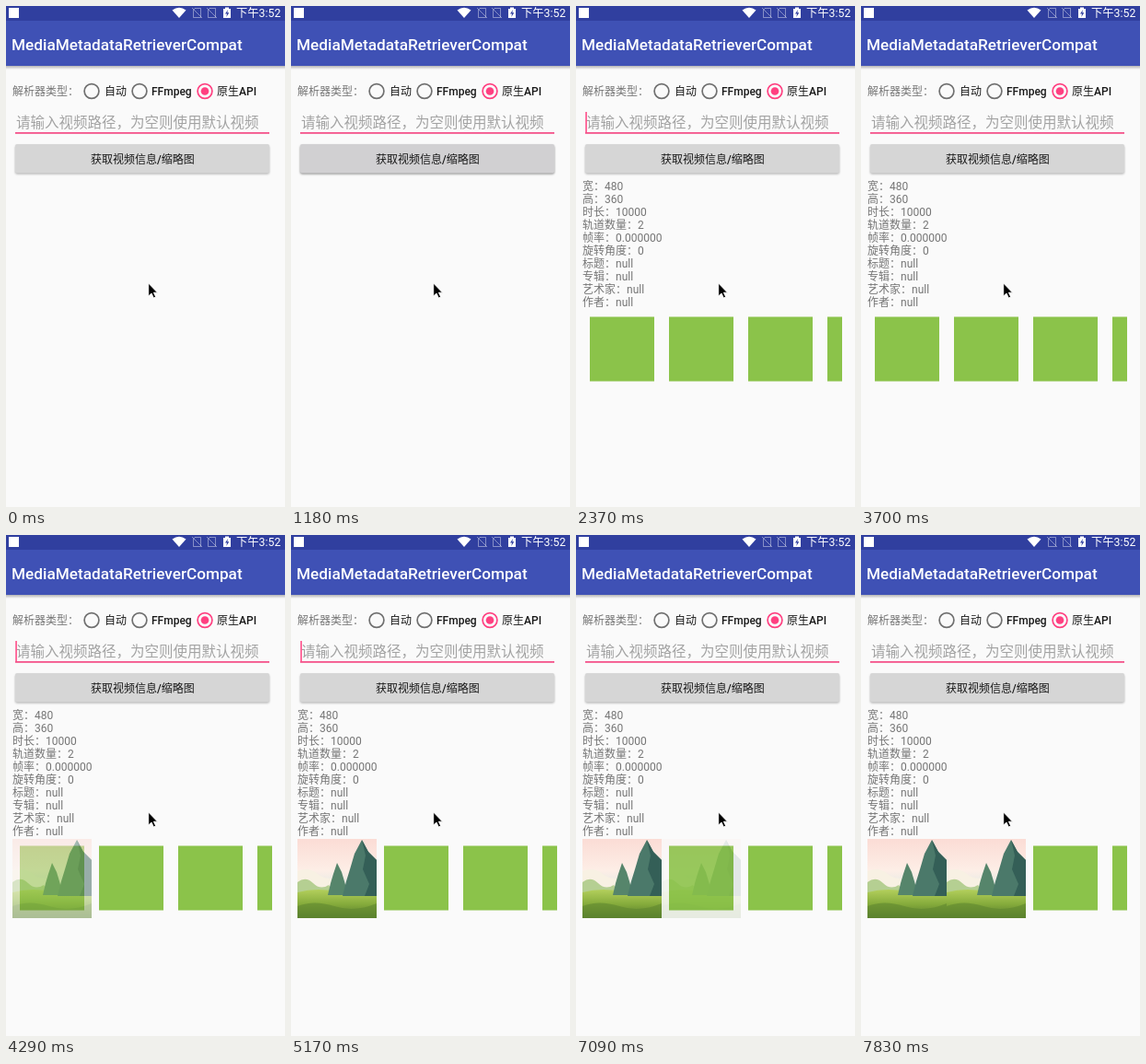
These frames come from a looping animation (303 by 544 pixels, 8 s). An HTML page:

```html
<!DOCTYPE html>
<html lang="zh-CN">
<head>
<meta charset="utf-8">
<title>MediaMetadataRetrieverCompat</title>
<style>
  html, body { margin: 0; width: 100%; height: 100%; overflow: hidden; background: #fafafa; }
  svg { display: block; width: 100%; height: 100%; }
  text { font: 12px Roboto, "Noto Sans CJK SC", "Noto Sans CJK", sans-serif; fill: #757575; white-space: pre; }
  .dark { fill: #181818; font-weight: 500; }
</style>
</head>
<body>
<svg viewBox="0 0 303 544" preserveAspectRatio="none">
  <defs>
    <linearGradient id="shade" x2="0" y2="1">
      <stop stop-color="#000" stop-opacity=".28"/>
      <stop offset="1" stop-color="#000" stop-opacity="0"/>
    </linearGradient>
    <linearGradient id="sky" x2="0" y2="1">
      <stop stop-color="#fbdcd5"/>
      <stop offset=".4" stop-color="#fdeee6"/>
      <stop offset=".7" stop-color="#d9e9e4"/>
    </linearGradient>
    <linearGradient id="grass" x2="0" y2="1">
      <stop stop-color="#b3cf5c"/>
      <stop offset=".5" stop-color="#86ac3c"/>
      <stop offset="1" stop-color="#557a2c"/>
    </linearGradient>
    <filter id="soft" x="-5%" y="-20%" width="110%" height="150%"><feGaussianBlur stdDeviation="1"/></filter>
    <clipPath id="strip"><rect x="7" y="330" width="282" height="86"/></clipPath>
    <symbol id="scene" width="86" height="86" viewBox="0 0 86 86">
      <rect width="86" height="86" fill="url(#sky)"/>
      <path d="M0 35Q12 30 22 38T44 41V64H0Z" fill="#f8f1e3"/>
      <path d="M0 47Q9 40 17 48T34 50L42 64H0Z" fill="#b5cf92"/>
      <path d="M0 58Q22 52 48 58T86 57V86H0Z" fill="url(#grass)"/>
      <path d="M43 26L48 36L51 46L55 61H33L36 48L39 38Z" fill="#56856b"/>
      <path d="M70 1L77 14L86 23V62H49L53 46L57 33L62 16Z" fill="#4b796a"/>
      <path d="M70 1L74 18L71 33L78 49L73 62H86V23L77 14Z" fill="#345f57"/>
      <path d="M0 73Q18 66 40 73T86 70V86H0Z" fill="#5f872f" opacity=".6"/>
    </symbol>
  </defs>

  <rect width="303" height="544" fill="#fafafa"/>
  <rect y="65" width="303" height="4" fill="url(#shade)"/>
  <rect width="303" height="65" fill="#3f51b5"/>
  <rect width="303" height="16" fill="#303f9f"/>

  <g fill="#fff">
    <rect x="3" y="2" width="11" height="11"/>
    <path d="M180.500 4.500Q188 -1 195.500 4.500L188 13Z"/>
    <g id="sims" fill="none" stroke="#fff" stroke-opacity=".42"/>
    <path d="M236 3H238V1.500H242V3H244V13H236Z"/>
    <path d="M241 4L238 8.500H240L239.300 12L242.300 7.300H240.300Z" fill="#303f9f"/>
  </g>
  <text x="250" y="11.500" style="font-size:12.300px;fill:#fff">下午3:52</text>
  <text x="6" y="48" style="font-size:17.200px;font-weight:500;fill:#fff">MediaMetadataRetrieverCompat</text>

  <text x="7" y="97">解析器类型：</text>
  <g id="radios"></g>

  <text x="11" y="131.500" style="font-size:15.500px;fill:#a3a3a3">请输入视频路径，为空则使用默认视频</text>
  <rect x="10" y="137" width="276" height="1.800" fill="#f4548b"/>
  <rect id="caret" x="10.300" y="115" width="1.500" height="22" fill="#ff4081"/>

  <rect id="shadow" x="10" y="151.500" width="276" height="31" rx="2" filter="url(#soft)"/>
  <rect id="button" x="10" y="150" width="276" height="31.500" rx="2"/>
  <text class="dark" x="148.300" y="170.500" text-anchor="middle">获取视频信息/缩略图</text>

  <g id="result">
    <g id="info"></g>
    <g id="thumbs" clip-path="url(#strip)"></g>
  </g>

  <path d="M154.700 301V315L158 312L160.300 317L162.700 316L160.400 311.200H164.500Z" fill="#000" stroke="#fff" stroke-width=".9"/>
</svg>
<script>
const LOOP = 8000, TICK = 147.5;
const $ = id => document.getElementById(id);
const clamp = v => Math.min(1, Math.max(0, v));

$('sims').innerHTML = [202, 218].map(x =>
  `<path d="M${x + 3} 2.500H${x + 9.5}V12.500H${x + 1.5}V4.500ZM${x} 2L${x + 11} 13"/>`).join('');

$('radios').innerHTML = [[93, 107, '自动'], [145, 158, 'FFmpeg'], [216, 229, '原生API']].map(([cx, x, label], i) => {
  const on = i === 2, color = on ? '#ff4081' : '#707070';
  return `<circle cx="${cx}" cy="92.500" r="7.900" fill="none" stroke="${color}" stroke-width="1.700"/>` +
    (on ? `<circle cx="${cx}" cy="92.500" r="4.300" fill="${color}"/>` : '') +
    `<text class="dark" x="${x}" y="97">${label}</text>`;
}).join('');

$('info').innerHTML = ['宽：480', '高：360', '时长：10000', '轨道数量：2', '帧率：0.000000',
  '旋转角度：0', '标题：null', '专辑：null', '艺术家：null', '作者：null']
  .map((s, i) => `<text x="7" y="${199.5 + i * 14.08}">${s}</text>`).join('');

$('thumbs').innerHTML = [0, 1, 2, 3].map(i =>
  `<rect class="blank" x="${15 + i * 86}" y="337.500" width="70" height="70" fill="#8bc34a"/>` +
  (i < 2 ? `<use class="shot" href="#scene" x="${7 + i * 86}" y="330"/>` : '')).join('');
const blanks = document.querySelectorAll('.blank');
const shots = document.querySelectorAll('.shot');

const caretOn = [[290, 730], [1480, 1770], [2220, 2670], [3260, 3700],
  [4290, 4730], [5170, 5620], [6200, 6650], [7240, 7680]];
const fadeStart = [4130, 7045];

function draw(t) {
  // The screen is sampled at a fixed rate, so fades move in steps.
  const held = Math.floor((t + 8) / TICK) * TICK;
  const press = clamp((held - 600) / 580) * (1 - clamp((held - 1330) / 580));
  const gray = 214 - 5 * press;

  $('caret').style.display = caretOn.some(([a, b]) => t >= a && t < b) ? '' : 'none';
  $('button').setAttribute('fill', `rgb(${gray},${gray - press},${gray + press})`);
  $('shadow').setAttribute('fill-opacity', 0.3 + 0.15 * press);
  $('result').style.display = t >= 1480 ? '' : 'none';
  shots.forEach((shot, i) => {
    const a = clamp((held - fadeStart[i]) / 300);
    shot.setAttribute('opacity', a);
    blanks[i].style.display = a < 1 ? '' : 'none';
  });
}

function loop() {
  draw(performance.now() % LOOP);
  requestAnimationFrame(loop);
}
loop();
</script>
</body>
</html>
```
